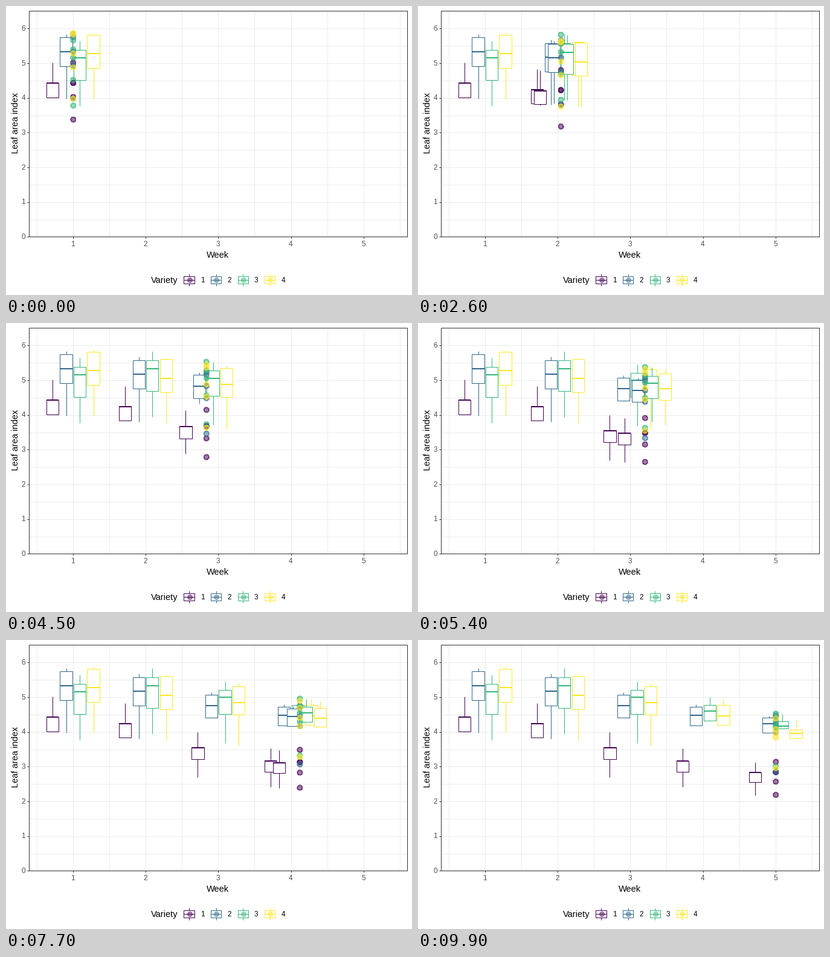
These frames come from a looping animation (672x480 px, 10 s). A matplotlib script:

```python
import numpy as np
import matplotlib.pyplot as plt
from matplotlib.animation import FuncAnimation
from matplotlib.colors import to_rgba
from matplotlib.patches import Rectangle

W, H, DPI = 672, 480, 96
PX = 72 / DPI
FRAMES = 100
WEEKS = np.arange(1, 6)
KEYS = [0, 25, 49, 74, 99]          # frame at which each week is reached
LEFT, TOP, RIGHT, BOTTOM = 38, 7, 664, 382
STEP = 120.25                       # pixels per week
DODGE = STEP * 0.75 / 4


class Variety:
    """Five plants that shift in week 2, then ease to their last values."""

    def __init__(self, color, first, last, shift, power):
        self.color = color
        second = np.array(first) + shift
        ease = ((WEEKS[1:] - 2) / 3)[:, None] ** power
        later = second + (np.array(last) - second) * ease
        self.values = np.vstack([first, later])
        self.stats = np.array([box_stats(v) for v in self.values])


def box_stats(v):
    """Whisker ends and quartiles; an outlier pulls its whisker to the box."""
    lo, q1, med, q3, hi = v
    reach = 1.5 * (q3 - q1)
    return [q1 if lo < q1 - reach else lo, q1, med, q3,
            q3 if hi > q3 + reach else hi]


VARIETIES = [
    Variety("#440154", [3.37, 4.02, 4.42, 4.43, 5.01],
            [2.18, 2.56, 2.83, 2.84, 3.13], -0.18, 0.65),
    Variety("#31688E", [3.97, 4.92, 5.33, 5.74, 5.83],
            [2.83, 3.98, 4.23, 4.41, 4.47], -0.16, 0.75),
    Variety("#35B779", [3.77, 4.51, 5.15, 5.39, 5.65],
            [3.00, 4.10, 4.16, 4.31, 4.52], 0.18, 1.15),
    Variety("#FDE725", [3.97, 4.87, 5.27, 5.82, 5.86],
            [2.95, 3.83, 3.96, 4.07, 4.38], -0.22, 1.5),
]


def px(week):
    return 110.8 + STEP * (week - 1)


def py(value):
    return 382.4 - 57.67 * value


# Whole coordinates name pixel columns and rows once lines are snapped.
plt.rcParams["font.family"] = "Liberation Sans"
fig = plt.figure(figsize=(W / DPI, H / DPI), dpi=DPI, facecolor="white")
ax = fig.add_axes([0, 0, 1, 1])
ax.set_xlim(0, W)
ax.set_ylim(H - 1, -1)
ax.axis("off")


def line(xs, ys, color, z, width=1):
    return ax.plot(xs, ys, color=color, lw=width * PX, zorder=z,
                   solid_capstyle="butt")[0]


def rect(x, y, w, h, color, z, fill="white"):
    return ax.add_patch(Rectangle((x, y), w, h, fc=fill, ec=color, lw=PX,
                                  zorder=z, joinstyle="miter"))


def label(x, y, text, size=8.8, color="black", ha="center", **kw):
    ax.text(x, y, text, size=size, color=color, ha=ha, va="baseline", **kw)


def dots(x, y, colors, z):
    rgba = [to_rgba(c, 0.5) for c in colors]
    return ax.scatter(x, y, s=(8.05 * PX) ** 2, c=rgba, edgecolors=rgba,
                      linewidths=PX, zorder=z, antialiased=False)


class Box:
    HALF = DODGE * 0.45

    def __init__(self, slot, z):
        self.offset = (slot - 1.5) * DODGE
        color = VARIETIES[slot].color
        self.low = line([], [], color, z)
        self.high = line([], [], color, z)
        self.body = rect(0, 0, 0, 0, color, z + 0.1)
        self.mid = line([], [], color, z + 0.2, 2)

    def place(self, week, stats):
        x = px(week) + self.offset
        lo, q1, med, q3, hi = py(stats)
        x0, x1 = x - self.HALF, x + self.HALF
        self.low.set_data([x, x], [lo, q1])
        self.high.set_data([x, x], [q3, hi])
        self.body.set_bounds(x0, q3, x1 - x0, q1 - q3)
        self.mid.set_data([x0, x1], [med, med])

    def show(self, on):
        for part in (self.low, self.high, self.body, self.mid):
            part.set_visible(on)


def draw_panel():
    for v in np.arange(0, 6.5, 0.5):
        line([LEFT, RIGHT], [py(v)] * 2, "#EBEBEB", 1)
    for w in np.arange(0.5, 6, 0.5):
        line([px(w)] * 2, [TOP, BOTTOM], "#EBEBEB", 1)
    rect(LEFT, TOP, RIGHT - LEFT, BOTTOM - TOP, "#333333", 90, "none")
    for v in range(7):
        line([LEFT - 3, LEFT], [py(v)] * 2, "#333333", 90)
        label(32, py(v) + 3.6, str(v), color="#4D4D4D", ha="right")
    for w in WEEKS:
        line([px(w)] * 2, [BOTTOM, BOTTOM + 3], "#333333", 90)
        label(px(w) - 0.5, 398, str(w), color="#4D4D4D")
    label(351, 417, "Week", 11)
    label(20.5, 193.5, "Leaf area index", 11, rotation=90,
          rotation_mode="anchor")


def draw_legend():
    label(240, 459, "Variety", 11, ha="left")
    y = 454
    for k, variety in enumerate(VARIETIES):
        x, color = 303 + 44.6 * k, variety.color
        line([x, x], [y - 10, y + 10], color, 50)
        rect(x - 8.64, y - 5.76, 17.28, 11.52, color, 51)
        line([x - 8.64, x + 8.64], [y, y], color, 52)
        dots(x + 0.5, y - 0.5, [color], 53)
        label(x + 22, 458, str(k + 1))


draw_panel()
draw_legend()
past = [[Box(k, 10 + 4 * w + k) for k in range(4)] for w in range(4)]
now = [Box(k, 40 + k) for k in range(4)]
points = dots(np.zeros(20), np.zeros(20),
              [v.color for v in VARIETIES for _ in range(5)], 60)
for w, group in enumerate(past):
    for box, variety in zip(group, VARIETIES):
        box.place(w + 1, variety.stats[w])


def update(i):
    t = np.interp(i, KEYS, range(5))
    w = min(int(t), 3)

    def blend(table):
        return table[w] + (table[w + 1] - table[w]) * (t - w)

    for key, group in zip(KEYS, past):
        for box in group:
            box.show(i > key)
    for box, variety in zip(now, VARIETIES):
        box.place(t + 1, blend(variety.stats))
    values = np.concatenate([blend(v.values) for v in VARIETIES])
    xs = np.full(values.size, px(t + 1) + 0.5)
    points.set_offsets(np.column_stack([xs, py(values) - 0.5]))
    return []


anim = FuncAnimation(fig, update, frames=FRAMES, interval=100,
                     repeat=True, repeat_delay=0, blit=False)
plt.show()
```
